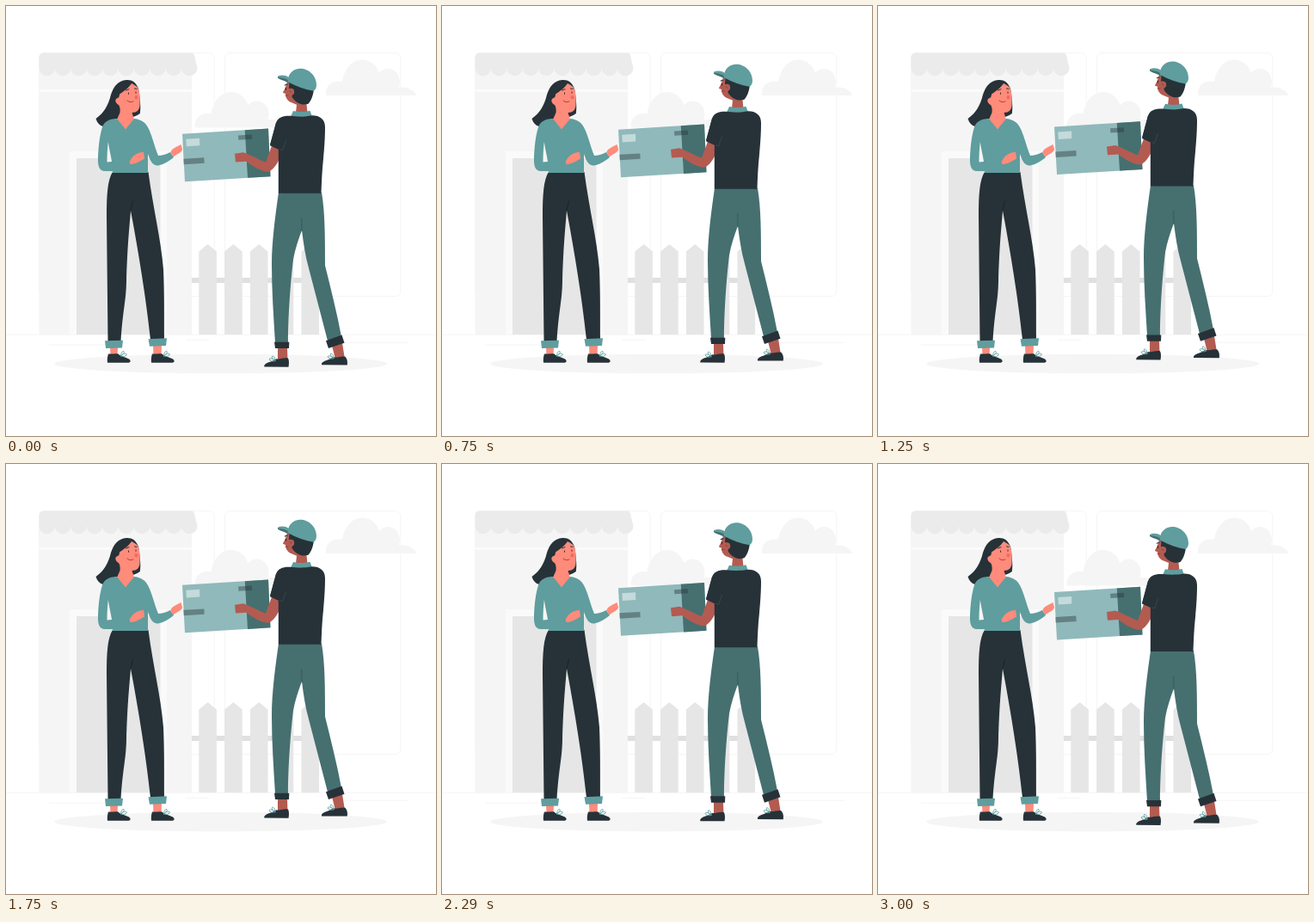
Write an HTML page that moves like this. It is 500 px wide and 500 px high and loops after 3040 ms.

```html
<!DOCTYPE html>
<html lang="en">
<head>
<meta charset="utf-8">
<title>Parcel delivery</title>
<style>
html, body { margin: 0; width: 100%; height: 100%; overflow: hidden; background: #fff; }
svg { display: block; width: 100vw; height: 100vh; }
.dark { fill: #263238; }
.teal { fill: #5f9d9e; }
.pine { fill: #466f70; }
.rose { fill: #ff8b7b; }
.tan { fill: #b35b51; }
.line { fill: none; stroke-linecap: round; stroke-linejoin: round; }
</style>
</head>
<body>
<svg viewBox="0 0 500 500">
  <defs>
    <path id="cloud" fill="#f5f5f5" d="M372 104C371 92 380 86 391 88C393 74 402 62.500 414 62.500C424 62.500 432 70 434 78C441 69 458 72 458 89L457 95C467 93 475 98 477 104Z"/>
    <path id="picket" fill="#e6e6e6" d="M0 382V285.500L10.300 277L20.600 285.500V382Z"/>
    <path id="lace" class="line" stroke="#5f9d9e" stroke-width=".9" d="M0 6C0 2 2 0 3.500 .5C4.500 2 2 5 0 6C2 3 6 2.500 7 4C6 6.500 3 7 0 6"/>
  </defs>

  <!-- Setting -->
  <g class="line" stroke="#ebebeb" stroke-width=".5">
    <rect x="38.500" y="54.700" width="203.700" height="282.800" rx="5.700"/>
    <rect x="254.500" y="54.700" width="204.300" height="282.800" rx="5.700"/>
    <path d="M0 382.300H500M50 394H116M209 388.300H236M384 391.200H468" stroke-linecap="butt"/>
  </g>
  <use href="#cloud"/>
  <use href="#cloud" x="-152.500" y="37.500"/>
  <path fill="#f5f5f5" d="M38.500 72H216V382H38.500Z"/>
  <path fill="#fdfdfd" d="M38.500 97.300H216V99.800H38.500Z"/>
  <path fill="#fafafa" d="M74 169H187V382H74Z"/>
  <path fill="#e6e6e6" d="M82 177H179.500V382H82Z"/>
  <path id="awning" fill="#ebebeb"/>
  <path fill="#e0e0e0" d="M216 316H364V322H216Z"/>
  <g id="fence"></g>
  <ellipse cx="249.500" cy="416" rx="193.500" ry="11.300" fill="#f5f5f5"/>

  <!-- Courier with the parcel -->
  <g id="courier">
    <path fill="#90b9bb" d="M205 149L305 142.700L307.500 198.500L208 204.500Z"/>
    <path class="pine" d="M277.800 144.400L305 142.700L307.500 198.500L281 200.100Z"/>
    <path fill="#c5dadb" d="M209.300 155L225 154L225.300 162.600L209.800 163.600Z"/>
    <path class="dark" opacity=".42" d="M206.300 178L230.300 176.600L230.700 183L206.700 184.500ZM270 150.800L285.700 149.700L286.200 155L270.400 156Z"/>

    <path class="tan" d="M316 397H327L327.500 413H316ZM379 395L391 392L394 411H383Z"/>
    <path class="pine" d="M317 217C313 245 309 275 309 301C309 330 311 360 313 392H328C328 360 331 320 334 295C336 283 340 272 344 261C346 277 348 291 352 305L374 389.500L390 385C385 358 378 330 371 302C371 270 371 240 367 217Z"/>
    <path class="line" stroke="#315354" stroke-width=".8" d="M343.800 247L344 262"/>
    <path class="dark" d="M312 391H329.300L329 398.300H313ZM372 389.500L390.500 382.800L393.500 392L375 398.300Z"/>
    <path class="dark" d="M300.300 419.800C299 415 309 414.500 314.500 410.500C319 411.500 323 408.500 328 409.800C329.500 413 329 417 328.500 420Z"/>
    <path class="dark" d="M367 417.600C366 413 375 412.500 380.500 408.500C386 409.500 390 406.800 394.500 408C397 411 397.300 414 396.800 417.800Z"/>
    <use href="#lace" transform="translate(313 407) scale(-1 1)"/>
    <use href="#lace" transform="translate(381 404) scale(-1 1)"/>

    <path class="tan" d="M327 87C326.500 92 324.500 96 321.800 101L325 102.300C325 107 327 110.500 332 112.500L338 115L337 124H350.500L349 110L340 90Z"/>
    <path class="dark" d="M329.500 89L358 97C357 105 355 110 351.500 114C344 116.500 337 113 332.500 106L333.500 97L329 96Z"/>
    <circle class="tan" cx="331.200" cy="100" r="4"/>
    <path class="line" stroke="#263238" stroke-width="1.100" d="M325.500 95.500V97.500M324.300 92.300L327 91.300"/>
    <path class="line" stroke="#7d3530" stroke-width=".7" d="M325.200 104.500L328 104.300M330 99L332 100.500"/>
    <path class="pine" d="M316 82.500C320 80.500 325 82 330 84.500L329 90C325 87 319 86.500 316 84Z"/>
    <path class="teal" d="M316 82C320 80 325 80.500 328.500 83C330 77 336 73 342 73C352 73 361 81 361 92C361 95.500 359.500 98 357.500 99C348 97.500 338 94 328 88.500L327.500 86C324 84 320 83.500 316 83Z"/>
    <path class="teal" d="M331 129L334 122.300C341 124 348 123.500 353.500 122L356 129Z"/>
    <path class="tan" d="M266 172L276 170.500C281 172 290 177 302 182L310 160L323 165C319 178 313 190 305 193C297 193 286 186 279.500 181L267 181.800Z"/>
    <path class="dark" d="M331 128C322 127.500 316 130 314 136L307 162.500L316.800 167V218H366.500C367 204 367.500 191 369 178C370 166 371 155 371 141C371 132 365 127.500 356 127.500C348 129 339 129 331 128Z"/>
    <path class="dark" d="M307 161.500L321.500 168L326 158L314 136Z"/>
    <path class="line" stroke="#455a64" stroke-width=".5" d="M318.500 167L321.600 168L325.500 157"/>
  </g>

  <!-- Customer -->
  <path class="dark" d="M140 86C130 87 125.500 93 122 103C119 116 113 125 104.500 131C106 136 109 139 113 140C119 139 123 136 127 131C138 132 149 130 155.800 125C157 118 156 108 154 96C151 88 146 85.500 140 86Z"/>
  <path class="rose" d="M146 90C142 96 137 99 132 102.500C132 105 131 107 129.500 107C126 108.500 127 113 131 115C132.500 117 133 121 132.500 124L129 132L139 145L149 132L146.500 124C152 124 155 121 155.500 116C156 108 156 99 152.500 94C150 92 148 91 146 90Z"/>
  <path class="line" stroke="#263238" stroke-width="1" d="M139.500 98L143 96.700M149.500 96L152 96.300M142.500 101V102.300M151 100V101.300"/>
  <path class="line" stroke="#a02724" stroke-width=".8" d="M141 110C143 112 146 112.200 148 111"/>
  <ellipse cx="151.500" cy="106.300" rx="2" ry="2.200" fill="#f36a60"/>

  <path class="rose" d="M121 396H130L129.500 407H121.500ZM171 394H181L180.500 407H171.500Z"/>
  <path class="dark" d="M124 193C118 202 117 220 117 245L118.500 390H133.500C136 352 139.500 345 140 320C141 283 143 262 145 238C152 275 162 332 168 388H184C184 350 184 330 183 306C180 270 171 235 165.500 193Z"/>
  <path class="line" stroke="#172025" stroke-width=".8" d="M145 238L147.500 227"/>
  <path class="teal" d="M115 389.300L136 388.800L135 397.500L116 398ZM165.500 387.300L187 386.300L186 395L167 395.800Z"/>
  <path id="shoe" class="dark" d="M119 404.500C123 405 127 403.500 130.500 404.500C134 409 145 408.500 144.700 413.500L143 414.800H118C117.500 411 118 407 119 404.500Z"/>
  <use href="#shoe" x="51"/>
  <use href="#lace" x="133.500" y="401"/>
  <use href="#lace" x="183.500" y="401"/>

  <path class="teal" d="M129 131C121 131 114 134 112 141C109 150 107.500 163 107 176C106.500 187 109 191.500 114 192H124V194H165V172C168 181 171 186 177 185.500C184 184 190 180 195 176L191 170C186 172.500 181 174 177 174C172 162 169 146 163 138C160 134 155 131.500 149 131L139 143.500Z"/>
  <path fill="#f5f5f5" d="M118.800 158C120 166 122 174 123 181L117.500 181.500C117.500 173 118 165 118.800 158Z"/>
  <path class="rose" d="M143.800 180.500C147 175 151 170.500 160 169.800L161 177.500C156 180 153 183 146 184L144 183.500Z"/>
  <path class="rose" d="M191.300 170C193 165.500 198 164 203.500 161L205 166.500C205.500 169.500 200 171.500 194.500 175.500Z"/>
</svg>
<script>
const el = id => document.getElementById(id);
const PERIOD = 3040, PHASE = 40, LIFT = 10;

el("awning").setAttribute("d",
  "M38.500 72V60Q38.500 54.500 44 54.500H216.500Q219.500 56 220 62L222.500 72" +
  "a9.200 9.200 0 0 1-18.400 0".repeat(10) + "Z");

el("fence").innerHTML = [0, 1, 2, 3, 4]
  .map(i => `<use href="#picket" x="${224.3 + 29.8 * i}"/>`).join("");

// The courier rises and sinks at a constant speed.
function draw(now) {
  const p = (now + PHASE) % PERIOD / PERIOD;
  const y = -LIFT * (1 - Math.abs(1 - 2 * p));
  el("courier").setAttribute("transform", `translate(0 ${y.toFixed(3)})`);
}

const start = performance.now();
function tick() {
  draw(performance.now() - start);
  requestAnimationFrame(tick);
}
tick();
</script>
</body>
</html>
```
